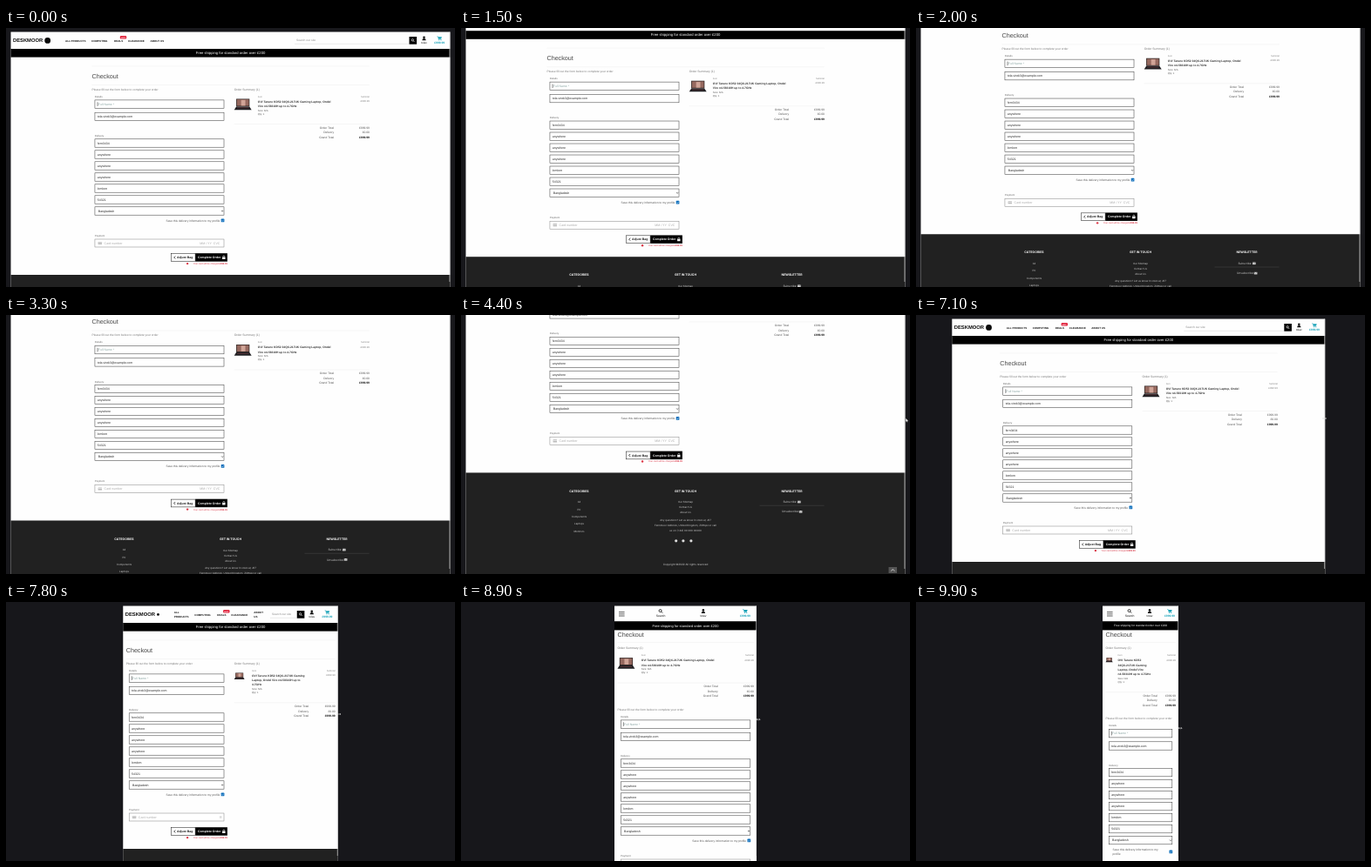
An HTML page that plays this animation: 515 by 298 pixels, repeating every 10000 ms.

```html
<!DOCTYPE html>
<html lang="en">
<head>
<meta charset="utf-8">
<title>Checkout</title>
<style>
html, body { margin: 0; width: 100%; height: 100%; overflow: hidden; background: #17171b; }
svg { display: block; width: 515px; height: 298px; }
text { font-family: "Liberation Sans", Arial, sans-serif; text-rendering: geometricPrecision; white-space: pre; }
.foot text { font-family: Inter, "Open Sans", sans-serif; }
</style>
</head>
<body>
<svg id="stage" viewBox="0 0 515 298"></svg>
<script>
const stage = document.getElementById('stage');
const LOOP = 10000, STEP = 100;
const INK = '#222', GREY = '#777', PALE = '#aaa', CYAN = '#17a2b8', RED = '#dc3545';
const USER = 'tolav', PRICE = '£999.99';
const PRODUCT = 'OVI Tarune KD52 34QX-217UK Gaming Laptop, Ondel Vire n4-58310H up to 4.7GHz';

const clamp = v => Math.max(0, Math.min(1, v));
const mix = (a, b, p) => a + (b - a) * p;
const smooth = p => p * p * (3 - 2 * p);

// Piecewise linear track through [time, value] points
function track(t, points) {
  if (t <= points[0][0]) return points[0][1];
  for (let i = 1; i < points.length; i++) {
    const [t0, v0] = points[i - 1], [t1, v1] = points[i];
    if (t <= t1) return mix(v0, v1, (t - t0) / (t1 - t0));
  }
  return points[points.length - 1][1];
}

// y is the middle of the lowercase/cap height
function text(x, y, str, size, fill = INK, o = {}) {
  return `<text x="${x}" y="${y + size * 0.35}" font-size="${size}" fill="${fill}"` +
    ` text-anchor="${o.at || 'start'}" font-weight="${o.bold ? 700 : 400}">${str}</text>`;
}
const bold = { bold: true }, end = { at: 'end' }, mid = { at: 'middle' };
const boldEnd = { at: 'end', bold: true }, boldMid = { at: 'middle', bold: true };

function rect(x, y, w, h, fill, stroke, sw = 0.5, r = 0) {
  return `<rect x="${x}" y="${y}" width="${w}" height="${h}" rx="${r}" fill="${fill}"` +
    (stroke ? ` stroke="${stroke}" stroke-width="${sw}"` : '') + '/>';
}
const circle = (x, y, r, fill) => `<circle cx="${x}" cy="${y}" r="${r}" fill="${fill}"/>`;
const path = (d, stroke, w, fill = 'none') =>
  `<path d="${d}" stroke="${stroke}" stroke-width="${w}" fill="${fill}"/>`;
const rule = (x0, x1, y, color = '#e9e9e9') => path(`M${x0} ${y}H${x1}`, color, 0.4);

const searchIcon = (x, y, r, color) =>
  `<circle cx="${x - r * 0.3}" cy="${y - r * 0.3}" r="${r}" fill="none" stroke="${color}" stroke-width="${r * 0.55}"/>` +
  path(`M${x + r * 0.4} ${y + r * 0.4}l${r} ${r}`, color, r * 0.6);
const userIcon = (x, y) => circle(x, y - 1.2, 1.3, '#111') +
  path(`M${x - 2.2} ${y + 2.4}q0 -2.3 2.2 -2.3t2.2 2.3z`, 'none', 0, '#111');
const cartIcon = (x, y) =>
  path(`M${x - 2.8} ${y - 2.1}h1l0.9 3.2h3`, CYAN, 0.6) +
  path(`M${x - 1.5} ${y - 1.6}h4.2l-0.8 2.2h-2.9z`, 'none', 0, CYAN) +
  circle(x - 0.6, y + 1.9, 0.55, CYAN) + circle(x + 1.8, y + 1.9, 0.55, CYAN);
const envelope = (x, y) => rect(x, y - 1.3, 3.6, 2.6, '#ddd') +
  path(`M${x} ${y - 1}l1.8 1.2l1.8 -1.2`, '#222', 0.35);

function wrap(str, max) {
  const lines = [''];
  for (const word of str.split(' ')) {
    const last = lines.length - 1;
    const joined = lines[last] ? lines[last] + ' ' + word : word;
    if (joined.length <= max) lines[last] = joined; else lines.push(word);
  }
  return lines;
}

function desktopHeader(L, R, W) {
  const p = clamp((W - 246) / 100), wrapped = W < 275;
  const at = (wide, tight) => L + mix(tight, wide, p);
  const item = (x, str) => {
    const words = str.split(' ');
    if (!wrapped || words.length < 2) return text(x, 14.6, str, 3, '#111', bold);
    return text(x, 12, words[0], 3, '#111', bold) + text(x, 17, words[1], 3, '#111', bold);
  };
  const deals = at(118.5, 108);
  const sx = L + track(W, [[246, 168.5], [428, 266], [504, 325.5]]);
  return text(L + 2.5, 14.4, 'DESKMOOR', 5.8, '#0a0a0a', bold) +
    circle(at(42.2, 40.2), 14.4, mix(1.4, 3.4, p), '#0a0a0a') +
    item(at(62.5, 58.5), 'ALL PRODUCTS') + item(at(92.5, 82), 'COMPUTING') +
    item(deals, 'DEALS') + item(at(134.5, 124), 'CLEARANCE') + item(at(160, 150), 'ABOUT US') +
    rect(deals + 6.8, 9, 7.4, 3.4, '#e0213a', null, 0, 1) +
    text(deals + 10.5, 10.7, 'HOT', 2.3, '#fff', boldMid) +
    text(sx + 2, 14.3, 'Search our site', 3.3, '#888') +
    rule(sx, R - 47, 18.3, '#ccc') +
    rect(R - 47, 10, 8.6, 8.7, '#000') + searchIcon(R - 42.8, 14.2, 1.2, '#fff') +
    userIcon(R - 30, 11.9) + text(R - 30, 16.8, USER, 3.2, '#111', mid) +
    cartIcon(R - 12.3, 11.9) + text(R - 12.3, 16.8, PRICE, 3.3, CYAN, boldMid) +
    rect(L, 24, W, 9.6, '#000') +
    text(L + W / 2, 28.8, 'Free shipping for standard order over £200', 4.2, '#fff', mid);
}

function mobileHeader(L, W) {
  const d = W - 87;
  const xs = L + 31 + d * 0.29, xu = L + 54 + d * 0.63, xc = L + 77 + d * 0.96;
  return [11.6, 13.8, 16].map(y => path(`M${L + 5} ${y}h6.6`, '#333', 0.8)).join('') +
    searchIcon(xs, 10.5, 1.5, '#111') + text(xs, 16, 'Search', 3.4, '#111', mid) +
    userIcon(xu, 10.6) + text(xu, 16, USER, 3.3, '#111', mid) +
    cartIcon(xc, 10.6) + text(xc, 16, PRICE, 3.3, CYAN, boldMid) +
    rect(L, 22.2, W, 10.2, '#000') +
    text(L + W / 2, 27.2, 'Free shipping for standard order over £200', Math.min(4, W * 0.0372), '#fff', mid);
}

function laptop(x, y, w) {
  const h = w * 0.68, m = w * 0.12;
  return rect(x + m, y, w - 2 * m, h * 0.66, '#2a2120') +
    rect(x + m * 1.3, y + h * 0.05, w - 2.6 * m, h * 0.54, '#96695f') +
    rect(x + w * 0.4, y + h * 0.1, w * 0.24, h * 0.48, '#d0a497') +
    path(`M${x + m} ${y + h * 0.66}H${x + w - m}L${x + w} ${y + h * 0.93}H${x}z`, 'none', 0, '#1f1f22') +
    path(`M${x + m * 1.4} ${y + h * 0.76}H${x + w - m * 1.4}`, '#7c4046', w * 0.03);
}

function summary(x, right, dy, lines) {
  const w = right - x, ix = x + w * 0.175, extra = (lines.length - 2) * 5.3;
  const y = v => v + dy;
  const total = (v, name, value, o) =>
    text(right - w * 0.263, y(v) + extra, name, 3.3, '#555', end) +
    text(right, y(v) + extra, value, 3.3, o ? '#111' : '#555', o || end);
  return text(x, y(70.6), 'Order Summary (1)', 3.4, GREY) +
    laptop(x, y(81.5), w > 140 ? 20 : w * 0.103) +
    text(ix, y(78.6), 'Item', 2.6, '#888') +
    text(right, y(78.6), 'Subtotal', 2.7, '#888', end) +
    text(right, y(84), PRICE, 2.9, '#888', end) +
    lines.map((s, i) => text(ix, y(84.7 + i * 5.2), s, 3.3, '#333', bold)).join('') +
    text(ix, y(94.6) + extra, 'Size: N/A', 2.8, '#555') +
    text(ix, y(98.9) + extra, 'Qty: 1', 2.8, '#555') +
    rule(x, right, y(110.5) + extra) +
    total(114.7, 'Order Total', PRICE) + total(120.1, 'Delivery', '£0.00') +
    total(125.5, 'Grand Total', PRICE, boldEnd);
}

function form(x, fx, fr, dy) {
  const y = v => v + dy, w = fr - fx;
  const field = (v, str, color = INK) => rect(fx + 0.4, y(v) - 4.7, w - 0.8, 9.4, '#fff', '#333', 0.5) +
    text(fx + 3.3, y(v), str, 3.5, color);
  const legend = (v, str) => text(fx + 0.3, y(v), str, 2.9, '#666');
  const save = 'Save this delivery information to my';
  const values = ['fern3434', 'anywhere', 'anywhere', 'anywhere', 'lomlom', '54321', ' Bangladesh'];
  const right = fr + 3.5;
  return text(x, y(70.6), 'Please fill out the form below to complete your order', 3.3, GREY) +
    legend(78.7, 'Details') + field(87.6, ' Full Name *', '#8aa5a3') +
    path(`M${fx + 3.5} ${y(85.3)}v4.6`, '#111', 0.5) +
    field(101.9, 'tola.virek3@example.com') +
    legend(124, 'Delivery') + values.map((s, i) => field(132.5 + i * 13, s)).join('') +
    path(`M${fr - 3.2} ${y(210)}l1 1.1l1 -1.1`, '#111', 0.6) +
    (w > 100 ? text(fr - 5, y(221.5), save + ' profile', 3.3, '#555', end)
      : text(fx + 4.7, y(221.3), save, 3.3, '#555') + text(fx + 4.7, y(226.4), 'profile', 3.3, '#555')) +
    rect(fr - 3.7, y(w > 100 ? 219.6 : 222), 3.7, 3.7, '#0b6dbb', null, 0, 0.6) +
    path(`M${fr - 2.9} ${y(w > 100 ? 221.5 : 223.9)}l0.8 0.8l1.4 -1.6`, '#fff', 0.5) +
    legend(238.6, 'Payment') +
    rect(fx + 0.4, y(243), w - 0.8, 9, '#fff', '#777', 0.45) +
    rect(fx + 4, y(245.9), 4.5, 3.2, '#bbb', null, 0, 0.5) + rect(fx + 4, y(246.7), 4.5, 0.6, '#fff') +
    text(fx + 11, y(247.5), 'Card number', 3.6, PALE) +
    text(fr - 5, y(247.5), w > 130 ? 'MM / YY  CVC' : '', 3.6, PALE, end) +
    (w < 130 ? rect(fr - 5.5, y(246.2), 2.6, 2.6, '#ddd') : '') +
    rect(right - 64.3, y(259.6), 27.5, 8.8, '#fff', '#111', 0.5) +
    path(`M${right - 59.7} ${y(262.5)}l-1.5 1.5l1.5 1.5`, '#111', 0.8) +
    text(right - 58, y(264), 'Adjust Bag', 3.5, '#111', bold) +
    rect(right - 36.7, y(259.2), 36.7, 9.5, '#000') +
    text(right - 34, y(264), 'Complete Order', 3.5, '#fff', bold) +
    rect(right - 5.8, y(263.6), 3.4, 2.5, '#fff', null, 0, 0.3) +
    path(`M${right - 5.1} ${y(263.7)}v-0.8a1 1 0 0 1 2 0v0.8`, '#fff', 0.55) +
    circle(right - 45.8, y(271.1), 1.2, RED) +
    text(right, y(271.1), `Your card will be charged <tspan font-weight="700">${PRICE}</tspan>`, 2.6, RED, end);
}

function footer(L, W) {
  const cx = L + W / 2, left = cx - 122, right = cx + 122;
  const list = (x, y0, gap, items) =>
    items.map((s, i) => text(x, y0 + i * gap, s, 2.9, '#ccc', mid)).join('');
  const head = (x, s) => text(x, 305, s, 3.5, '#fff', boldMid);
  return '<g class="foot">' + rect(L, 284, W, 130, '#212121') +
    head(left, 'CATEGORIES') + head(cx, 'GET IN TOUCH') + head(right, 'NEWSLETTER') +
    list(left, 317.7, 8.4, ['All', 'PC', 'Components', 'Laptops', 'Monitors']) +
    list(cx, 318, 6, ['Our Sitemap', 'Contact Us', 'About Us']) +
    list(cx, 338.2, 6, ['Any questions? Let us know in store at, 417',
      'Fennmoor Aldbrick, United Kingdom, ZX9qzz or call', 'us on (+44) 00 000 00000']) +
    [-10.8, -2.6, 6.4].map(d => circle(cx + d, 362.4, 1.6, '#ddd')).join('') +
    text(cx, 389.6, 'Copyright ©2022 All rights reserved', 3, '#ccc', mid) +
    text(right - 2.4, 317.6, 'Subscribe', 3.2, '#ccc', mid) + envelope(right + 6.5, 317.6) +
    rule(right - 37, right + 37, 321.8, '#555') +
    text(right - 2, 328.9, 'Unsubscribe', 3.2, '#ccc', mid) + envelope(right + 8.3, 328.9) + '</g>';
}

function cursor(t) {
  if (t >= 6400) {
    const x = track(t, [[6800, 512], [7100, 468.5], [7800, 381.8], [8900, 341], [9900, 303]]);
    const y = track(t, [[6400, 110.5], [7100, 119], [7800, 129], [8900, 135.2], [9900, 145.2]]);
    return path(`M${x - 2} ${y}h4M${x - 1} ${y - 1}l-1 1l1 1M${x + 1} ${y - 1}l1 1l-1 1`, '#ddd', 0.6);
  }
  const arrow = (x, y) => path(`M${x} ${y}v3.8l0.9 -0.8l0.7 1.4l0.6 -0.3l-0.6 -1.3h1.2z`, 'none', 0, '#eee');
  if (t >= 2800 && t < 3300) return arrow(512.3, 58);
  if (t >= 4200 && t < 5000) return arrow(510.2, 119);
  return '';
}

function scrollAt(t) {
  const a = 47.5, b = 104;
  if (t < 4100) return a * (1 - (1 - clamp((t - 1300) / 800)) ** 2);
  if (t < 5100) return mix(a, b, 1 - (1 - clamp((t - 4100) / 500)) ** 4);
  return b * (1 - smooth(clamp((t - 5100) / 600)));
}

function draw(t) {
  const W = track(t, [[6800, 504], [7100, 428], [7800, 246.5], [7900, 229], [8900, 163], [9000, 163], [9900, 87]]);
  const cx = track(t, [[6800, 257.5], [7100, 255.3], [7800, 257.5]]);
  const s = scrollAt(t);
  const L = cx - W / 2, R = cx + W / 2, stacked = W < 246;
  const half = Math.min(159.25, W / 2 - 3.25);
  const x = cx - half + 0.2, right = cx + half + 0.2;
  const sumX = stacked ? x : cx + 4.2;
  const lines = wrap(PRODUCT, Math.floor((right - sumX) * 0.304));
  const formDy = stacked ? 53 + (lines.length - 2) * 5.3 : 0;

  let page = rect(L, 4.5, W, 410, '#fefefe');
  if (stacked) {
    page += mobileHeader(L, W) + text(x, 37.4, 'Checkout', 7.2, '#444') + rule(x, right, 46.5) +
      summary(x, right, -17.4, lines) + form(x, x + 3.4, R - 6.8, formDy);
  } else {
    page += desktopHeader(L, R, W) + rule(x, right, 44) + text(x, 55, 'Checkout', 7.2, '#444') +
      rule(x, right, 65.5) + summary(sumX, right, 0, lines) +
      form(x, x + 3.1, x + half - 7.3, 0) + footer(L, W);
  }
  const top = Math.max(0, 4.5 - s);
  const upButton = s > 60
    ? rect(490.5, 290, 9.5, 7, '#555') + path('M493.3 294.6l2 -2l2 2', '#eee', 0.8) : '';
  stage.innerHTML = rect(0, 0, 515, 298, '#17171b') +
    `<g transform="translate(0 ${-s})">${page}</g>` +
    rect(R - 0.9, top, 0.6, 292 - top, '#d8d8d8') + upButton + cursor(t);
}

let shown = -1;
function frame(now) {
  const t = Math.floor((now % LOOP) / STEP) * STEP;
  if (t !== shown) draw(shown = t);
  requestAnimationFrame(frame);
}
draw(0);
requestAnimationFrame(frame);
</script>
</body>
</html>
```
